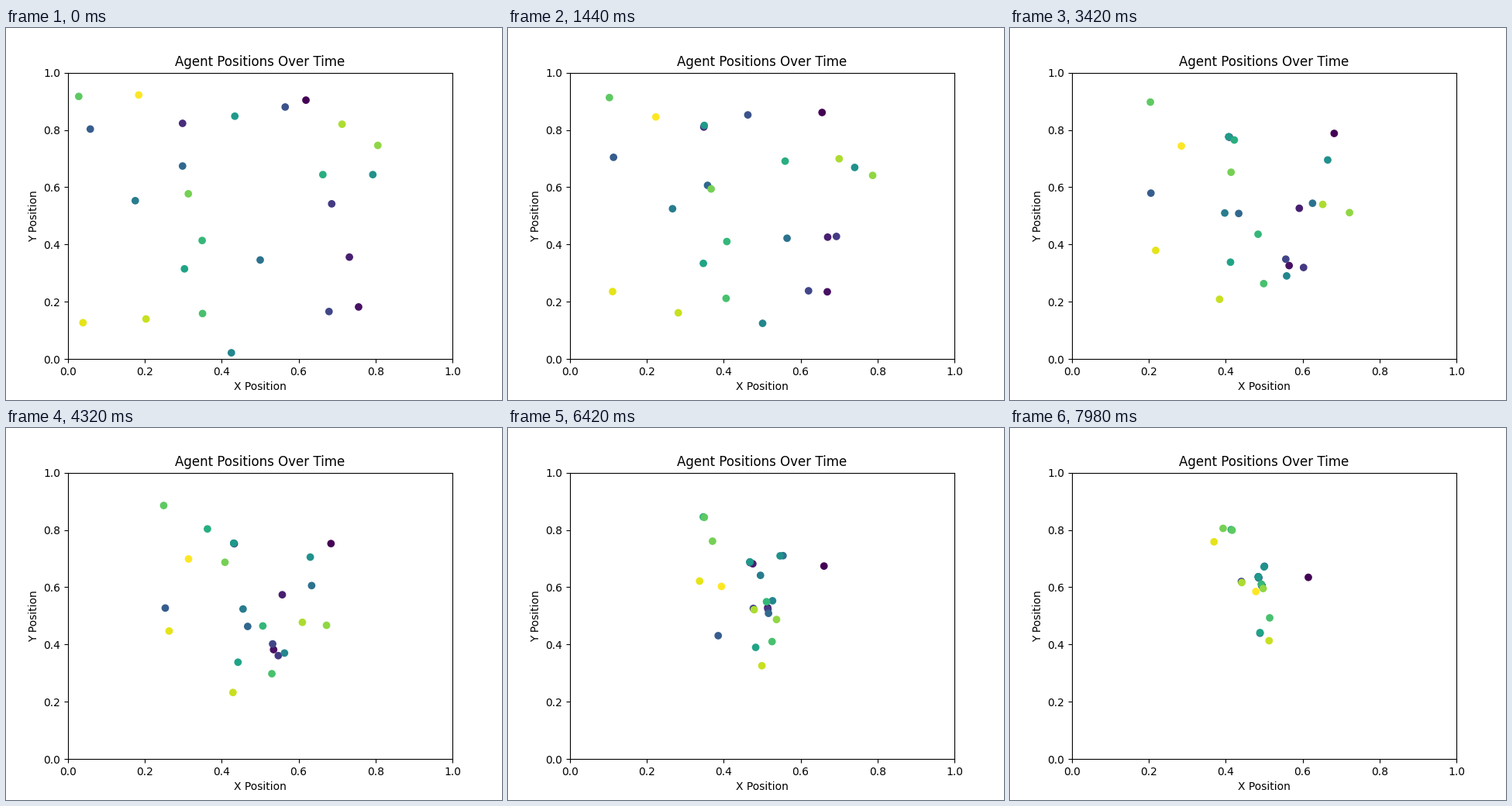
A matplotlib script for the animation above (8 s loop, 640 px wide and 480 px high).

```python
import numpy as np
import matplotlib.pyplot as plt
from matplotlib.animation import FuncAnimation

STEPS = 134
TICK = 20            # ms per animation frame
TICKS_PER_STEP = 3   # agents move every 60 ms
LOOP = 8000          # ms

# Per agent: start x, start y, index of the agent it follows, speed per step
AGENTS = [
    (.619, .904, 20, .00237), (.756, .182, 16, .00423),
    (.732, .356, 3, .00388), (.298, .823, 20, .00216),
    (.686, .542, 1, .00477), (.679, .166, 19, .00388),
    (.565, .880, 3, .00442), (.058, .803, 14, .00471),
    (.298, .674, 1, .00376), (.500, .346, 12, .00416),
    (.175, .553, 2, .00400), (.425, .022, 2, .00534),
    (.793, .644, 13, .00242), (.434, .848, 3, .00386),
    (.303, .315, 4, .00200), (.663, .644, 18, .00473),
    (.349, .414, 2, .00247), (.350, .159, 4, .00322),
    (.028, .917, 0, .00311), (.313, .577, 15, .00237),
    (.806, .746, 1, .00444), (.713, .820, 5, .00506),
    (.203, .140, 17, .00341), (.039, .127, 19, .00543),
    (.184, .922, 8, .00359),
]


def simulate():
    """Every agent heads for its leader at its own constant speed."""
    table = np.array(AGENTS)
    pos, leader, speed = table[:, :2], table[:, 2].astype(int), table[:, 3]
    path = [pos]
    for _ in range(STEPS - 1):
        gap = pos[leader] - pos
        dist = np.hypot(gap[:, 0], gap[:, 1])
        reach = np.minimum(speed, dist) / np.maximum(dist, 1e-9)
        pos = pos + gap * reach[:, None]
        path.append(pos)
    return path


path = simulate()

fig, ax = plt.subplots(figsize=(6.4, 4.8), dpi=100)
dots = ax.scatter(*path[0].T, c=np.arange(len(AGENTS)), cmap="viridis")
ax.set(xlim=(0, 1), ylim=(0, 1), xlabel="X Position", ylabel="Y Position",
       title="Agent Positions Over Time")


def update(frame):
    dots.set_offsets(path[frame // TICKS_PER_STEP])
    return (dots,)


anim = FuncAnimation(fig, update, frames=LOOP // TICK, interval=TICK,
                     repeat=True, repeat_delay=0)
plt.show()
```
